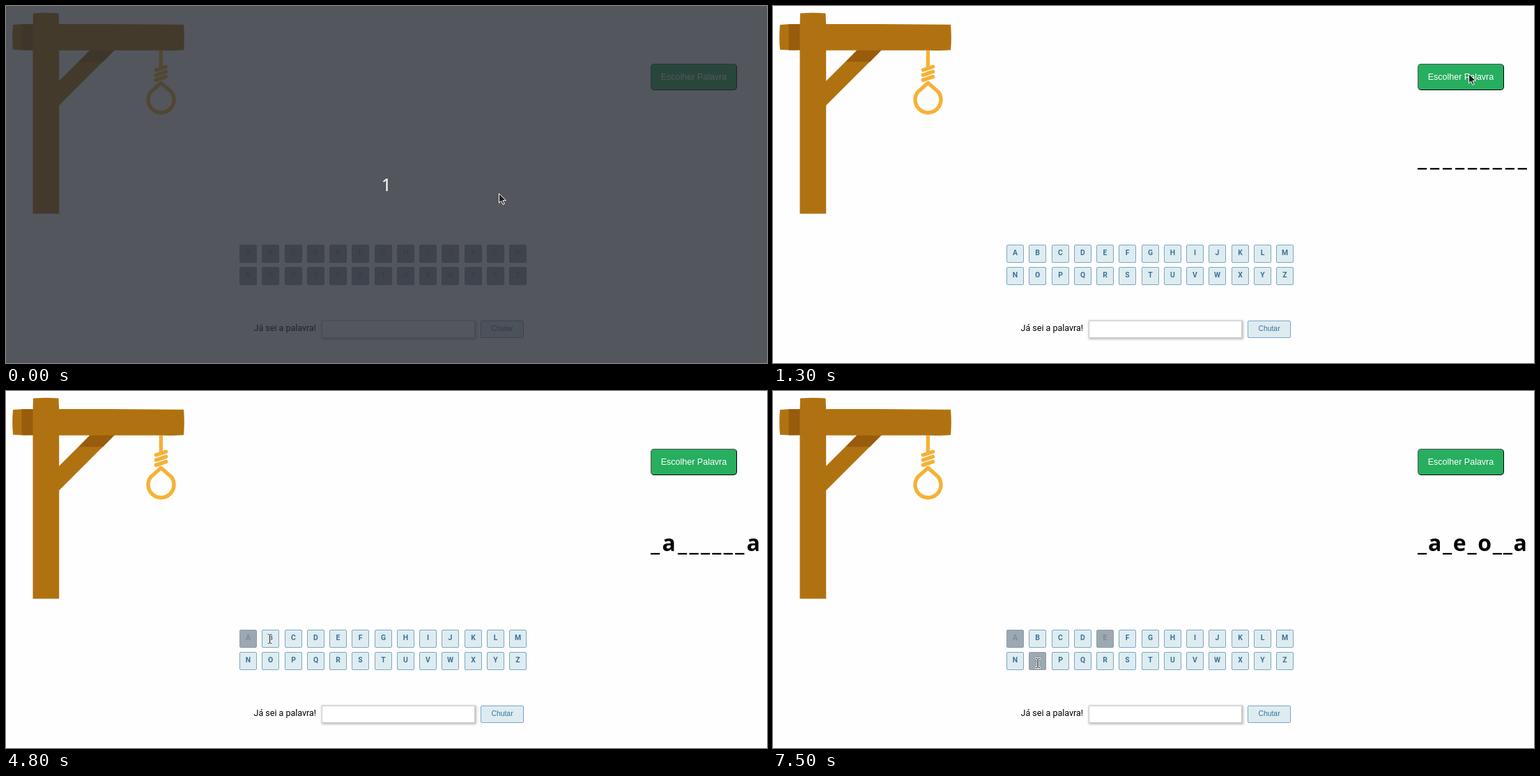
An HTML page that plays this animation: 1092 by 513 pixels, repeating every 8 s.

```html
<!DOCTYPE html>
<html lang="pt">
<head>
<meta charset="utf-8">
<title>Forca</title>
<style>
html, body { margin: 0; width: 100%; height: 100%; overflow: hidden; background: #fefefe; }
#stage { position: relative; width: 1092px; height: 513px; overflow: hidden; }
#stage > * { position: absolute; box-sizing: border-box; white-space: nowrap; }
svg { left: 0; top: 0; overflow: visible; }
.key, #guess {
  border: 1px solid #7aa7c7; border-radius: 2px;
  background: #deecf0; color: #39739d; text-align: center;
}
.key { width: 25px; height: 26px; font: bold 10.4px/22px Roboto, sans-serif; }
.key.off { background: #9ca8b2; color: #6f87a0; }
.key.used { background: #9ca8b2; border-color: #909ca8; color: #7b8a9c; }
#choose {
  left: 925px; top: 83px; width: 124px; height: 38px;
  border: 1px outset #000; border-radius: 5px; background: #27ae5f; color: #fff;
  font: 12.5px/36px "Liberation Sans", Arial, sans-serif; text-align: center;
}
#choose.down { border-style: inset; }
#word {
  left: 925px; top: 196px; width: 157px; display: flex; justify-content: space-between;
  font: bold 32px/44px "Noto Sans", "Open Sans", sans-serif; color: #000;
}
#label { left: 355.5px; top: 455px; font: 12.5px/16px Roboto, sans-serif; color: #000; }
#field {
  left: 453px; top: 452px; width: 220px; height: 25px;
  border: 1px solid #ccc; background: #fff; box-shadow: 1px 1px 3px 1px rgba(0, 0, 0, .25);
}
#guess {
  left: 681px; top: 452px; width: 62px; height: 25px;
  font: 10.4px/22px "Liberation Sans", Arial, sans-serif;
}
#veil {
  inset: 0; background: rgba(40, 44, 52, .8); color: #fff; text-align: center;
  font: 25px/513px "Noto Sans", "Open Sans", sans-serif;
}
</style>
</head>
<body>
<div id="stage">
  <svg width="1092" height="513">
    <g fill="#b07210">
      <path d="M76 108L121 63H156L76 143Z"/>
      <path fill="#995c0c" d="M121 63H156L139 80.3H104.5Z"/>
      <path d="M10 27Q23 25.6 38 26H150L255 26.8Q256.6 45 255 63.2Q245 64.2 220 63.8H76L38 63.2Q23 64 10 62.8Q8.4 45 10 27Z"/>
      <path fill="#995c0c" d="M22.5 26.2H39V63.4H22.5Z"/>
      <path d="M39 10.6Q57 9 75.5 10.6L76.2 28V298.5H38.5V30Z"/>
    </g>
    <g fill="none" stroke="#f6b135" stroke-width="5.4" stroke-linecap="round">
      <path stroke-linecap="butt" d="M222.4 64V90"/>
      <path d="M215.3 92L229.5 87.2M215.3 99.2L229.5 94.4M215.3 106.4L229.5 101.6"/>
      <path stroke-linejoin="round" d="M222.5 110.5L208 123.2A18.5 18.5 0 1 0 237 123.2Z"/>
    </g>
  </svg>
  <div id="choose">Escolher Palavra</div>
  <div id="word"></div>
  <div id="label">Já sei a palavra!</div>
  <div id="field"></div>
  <div id="guess">Chutar</div>
  <div id="veil">1</div>
  <svg width="1092" height="513">
    <g id="cursor">
      <path id="arrow" fill="#222" stroke="#fff" stroke-width="1"
        d="M.5 .5V14L3.6 11.2L6 16.4L8.3 15.4L6 10.4H10.4Z"/>
      <g id="beam" fill="none">
        <path stroke="#fff" stroke-width="3" d="M-3.5 -6.5H3.5M0 -6.5V6.5M-3.5 6.5H3.5"/>
        <path stroke="#222" stroke-width="1.2" d="M-3 -6.5H-.6M.6 -6.5H3M0 -6V6M-3 6.5H-.6M.6 6.5H3"/>
      </g>
    </g>
  </svg>
</div>
<script>
const LOOP = 8000, TICK = 100;
const $ = id => document.getElementById(id);
const smooth = p => p * p * (3 - 2 * p);
const easeIn = p => p * p;

// start time, number of ticks, end x, end y, easing
const moves = [
  [0, 1, 707, 269, smooth],
  [300, 7, 998, 97, smooth],
  [2300, 9, 349, 346, smooth],
  [3200, 2, 344, 355.5, smooth],
  [4400, 9, 456, 358, easeIn],
  [5300, 1, 462, 355, smooth],
  [5500, 1, 469, 355, smooth],
  [5800, 3, 470, 356, smooth],
  [6600, 1, 471, 356, smooth],
  [6700, 5, 380, 391, smooth]
];
const words = [[0, ""], [1300, "_________"], [3500, "_a______a"], [5900, "_a_e____a"], [7500, "_a_e_o__a"]];
const presses = { A: 3500, E: 5900, O: 7500 };

const keys = [..."ABCDEFGHIJKLMNOPQRSTUVWXYZ"].map((letter, i) => {
  const x = 335 + (i % 13) * 32.25, y = i < 13 ? 343 : 375;
  const el = document.createElement("div");
  el.textContent = letter;
  el.style.left = Math.round(x) + "px";
  el.style.top = y + "px";
  $("stage").insertBefore(el, $("veil"));
  return { el, cx: x + 12.5, cy: y + 12.5, pressed: presses[letter] ?? Infinity };
});

function cursorAt(t) {
  let [, , x, y] = moves[0];
  for (const [start, ticks, toX, toY, ease] of moves) {
    if (t < start) break;
    const p = ease(Math.min(1, (Math.floor((t - start) / TICK) + 1) / ticks));
    x += (toX - x) * p;
    y += (toY - y) * p;
  }
  return [x, y];
}

let shown = null;
function showWord(word) {
  if (word === shown) return;
  shown = word;
  $("word").replaceChildren(...[...word].map(c => {
    const span = document.createElement("span");
    span.textContent = c;
    return span;
  }));
}

function draw(t) {
  $("veil").style.display = t < 100 ? "" : "none";
  $("choose").className = t >= 1100 && t < 1300 ? "down" : "";
  showWord(words.findLast(([start]) => t >= start)[1]);
  for (const k of keys) {
    k.el.className = "key" + (t < 1300 ? " off" : t >= k.pressed ? " used" : "");
  }
  const [x, y] = cursorAt(t);
  const onText = keys.some(k => Math.abs(x - k.cx) < 5 && Math.abs(y - k.cy) < 7);
  $("cursor").setAttribute("transform", `translate(${x} ${y})`);
  $("arrow").style.display = onText ? "none" : "";
  $("beam").style.display = onText ? "" : "none";
}

const begin = performance.now();
function frame() {
  draw((performance.now() - begin) % LOOP);
  requestAnimationFrame(frame);
}
frame();
</script>
</body>
</html>
```
